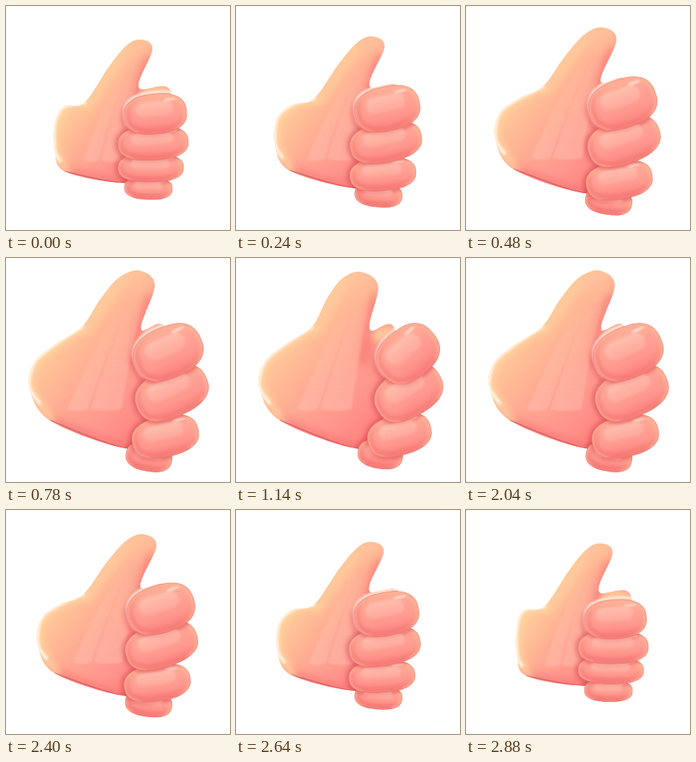
Animation, 280 px wide and 280 px high, one loop 2.94 s. Source, as an HTML page with a canvas:

```html
<!DOCTYPE html>
<html lang="en">
<head>
<meta charset="utf-8">
<title>Thumbs up</title>
<style>
  html, body { margin: 0; width: 100%; height: 100%; overflow: hidden; background: #fff; }
  canvas { display: block; width: 280px; height: 280px; }
</style>
</head>
<body>
<canvas id="stage" width="280" height="280"></canvas>
<script>
const ctx = document.getElementById('stage').getContext('2d');
const LOOP = 2940, STEP = 60, TURN = 1410, OPEN = 630, HOLD = 780;

// hand outline, clockwise: where each key point rests and where it opens to
const TIP = 0, INNER = 1, CROTCH = 2, UNDER = 4, HEEL = 5, BASE = 6, WRIST = 7, SHOULDER = 10, OUTER = 12;
const outline = [
  [168, 42, 167, 16], [183, 54, 186, 34], [166, 102, 169, 89], [206, 108, 200, 91],
  [190, 212, 197, 226], [145, 221, 150, 238], [74, 207, 55, 203], [61, 180, 29, 160],
  [61, 147, 36, 130], [72, 126, 60, 109], [98, 121, 95, 86], [128, 77, 119, 50], [150, 50, 142, 24]
];

const lerp = (a, b, k) => a + (b - a) * k;
const clamp = (v, lo, hi) => Math.max(lo, Math.min(hi, v));
const between = (p, q, k) => [lerp(p[0], q[0], k), lerp(p[1], q[1], k)];
const quad = (i, a, b, c) => a + b * i + c * i * i;

// the upper hand starts slowly; the thumb leans in, then back with the twist
function bodyAt(open, twist) {
  const lean = 30 * open * open * (1 - open) - 12 * twist;
  return outline.map(([x, y, x1, y1]) => {
    const k = y < 130 ? open * open : open;
    const high = Math.max(0, (115 - y) / 75);
    return [lerp(x, x1, k) + lean * high, lerp(y, y1, k) + 2 * twist * high];
  });
}

// i: 0 index finger to 3 little finger
function fingerAt(i, open, twist) {
  return {
    x: 187 - 3 * i + open * open * quad(i, 16, 13.5, -6.2) + twist * (14 - 4 * i),
    y: quad(i, 135, 39, -2.7) + open * (4 - 21 * Math.cos(1.25 * i)) + twist * (2 - 2 * i),
    rx: quad(i, 39, 9, -4) + open * (5 - 2 * i) + twist * (i - 4),
    ry: 25 - 3.6 * i + open * quad(i, 7, 3, -1.4),
    tilt: (2.7 * i - 6 + open * quad(i, -18, -8.8, 5.8) - 18 * twist * .4 ** i) * Math.PI / 180
  };
}

function spline(pts, closed) {
  const n = pts.length, path = new Path2D();
  const at = i => closed ? pts[(i + n) % n] : pts[clamp(i, 0, n - 1)];
  path.moveTo(...pts[0]);
  for (let i = 0; i < (closed ? n : n - 1); i++) {
    const [a, b, c, d] = [at(i - 1), at(i), at(i + 1), at(i + 2)];
    path.bezierCurveTo(b[0] + (c[0] - a[0]) / 6, b[1] + (c[1] - a[1]) / 6,
                       c[0] - (d[0] - b[0]) / 6, c[1] - (d[1] - b[1]) / 6, c[0], c[1]);
  }
  if (closed) path.closePath();
  return path;
}

// rounded pad: a superellipse
function pad({ x, y, rx, ry, tilt }) {
  const cos = Math.cos(tilt), sin = Math.sin(tilt);
  const bend = v => Math.sign(v) * Math.abs(v) ** .8;
  const pts = Array.from({ length: 32 }, (_, i) => {
    const a = i * Math.PI / 16, u = rx * bend(Math.cos(a)), w = ry * bend(Math.sin(a));
    return [x + u * cos - w * sin, y + u * sin + w * cos];
  });
  return spline(pts, true);
}

function gradient(x0, y0, x1, y1, ...stops) {
  const g = ctx.createLinearGradient(x0, y0, x1, y1);
  stops.forEach((c, i) => g.addColorStop(i / (stops.length - 1), c));
  return g;
}

function inside(path, draw) {
  ctx.save();
  ctx.clip(path);
  draw();
  ctx.restore();
}

function softFill(path, color, blur) {
  ctx.save();
  ctx.filter = `blur(${blur}px)`;
  ctx.fillStyle = color;
  ctx.fill(path);
  ctx.restore();
}

function softStroke(path, color, width, blur, dx = 0, dy = 0) {
  ctx.save();
  ctx.filter = `blur(${blur}px)`;
  ctx.translate(dx, dy);
  ctx.lineWidth = width;
  ctx.lineCap = 'round';
  ctx.strokeStyle = color;
  ctx.stroke(path);
  ctx.restore();
}

function oval(x, y, rx, ry) {
  const path = new Path2D();
  path.ellipse(x, y, rx, ry, 0, 0, 7);
  return path;
}

// light band running from the thumb down to the palm
function drawBand(p, k0, k1) {
  const foot = p[BASE][1] - 14;
  const edge = k => [between(p[OUTER], p[INNER], .1 + .8 * k), between(p[SHOULDER], p[CROTCH], k),
                     [lerp(p[WRIST][0], 160, k), foot]];
  const [a, b] = [edge(k0), edge(k1)];
  const path = new Path2D();
  path.moveTo(...a[0]);
  path.quadraticCurveTo(...a[1], ...a[2]);
  path.quadraticCurveTo((a[2][0] + b[2][0]) / 2, foot + 4, ...b[2]);
  path.quadraticCurveTo(...b[1], ...b[0]);
  softFill(path, gradient(0, a[0][1], 0, foot, '#ffc4a800', '#ffc4a855', '#ffc8b866'), 1);
}

function drawBody(p, fingerPaths) {
  const path = spline(p, true);
  const [wx, wy] = p[WRIST], [cx, cy] = p[CROTCH];
  ctx.fillStyle = gradient(wx + 5, wy - 50, 172, p[HEEL][1] - 15,
    '#ffd09a', '#ffbb95', '#ffa492', '#ff958b', '#ff807d');
  ctx.fill(path);

  inside(path, () => {
    // thumb: light tip and outer side, deep pink inner side
    softStroke(spline([p[SHOULDER], p[11], p[OUTER], p[TIP]]), '#ffcf9fcc', 14, 6, 4, 3);
    softFill(oval(...between(p[OUTER], p[INNER], .55), 17, 22), '#ffbe99bb', 7);
    softStroke(spline([between(p[INNER], p[CROTCH], .3), p[CROTCH], [cx - 8, cy + 40]]), '#f8706fbb', 12, 6);
    softFill(oval(cx + 22, cy + 7, 20, 10), '#ffd09fdd', 4);

    softStroke(spline([p[UNDER], p[HEEL], p[BASE]]), '#f76d70aa', 10, 6);
    softStroke(spline([p[BASE], p[WRIST], p[8], p[9], p[SHOULDER]]), '#ffd8a4cc', 8, 4, 3, 1);
    softStroke(spline([between(p[BASE], p[WRIST], .5), p[WRIST], p[8], p[9], p[SHOULDER]]), '#fff6e6', 4, 1.5);
    drawBand(p, .36, .56);
    drawBand(p, .58, .88);

    softStroke(fingerPaths[0], '#fff4e2', 4, 1, 0, -2);
    for (const f of fingerPaths.slice(1)) softStroke(f, '#d5434fcc', 5, 3);
    softStroke(fingerPaths[0], '#e0525caa', 5, 3, -1, 4);
    softStroke(spline([p[UNDER], p[HEEL], p[BASE]]), '#c9505499', 1.5, .6);
  });
}

function drawFinger({ x, y, rx, ry, tilt }, path, above) {
  const dx = -Math.sin(tilt) * ry, dy = Math.cos(tilt) * ry;
  ctx.fillStyle = gradient(x - dx, y - dy, x + dx, y + dy, '#ffb49c', '#ffa496', '#ff988e', '#fa7d79');
  ctx.fill(path);
  inside(path, () => {
    softStroke(path, '#f06468cc', 5, 3, 2, -2);
    softStroke(path, '#ffc29c', 4, 2.5, -1, 1);
    if (above) softStroke(above, '#e0505acc', 5, 2.5);
    ctx.translate(x, y);
    ctx.rotate(tilt);
    const gloss = new Path2D();
    gloss.roundRect(-rx * .62, -ry * .62, rx * 1.2, ry * .74, ry * .35);
    softFill(gloss, gradient(0, -ry * .6, 0, ry * .15, '#ffd2c088', '#ffc4b444'), 1.5);
    softFill(oval(rx * .5, -ry * .66, rx * .2, ry * .06), '#fff0e2aa', 1);
    softStroke(spline([[-rx * .6, ry * .9], [0, ry], [rx * .6, ry * .9]]), '#ef686a', 3, 2);
  });
  ctx.lineWidth = .6;
  ctx.strokeStyle = '#dc5c5e77';
  ctx.stroke(path);
}

// the way back mirrors the way out
function render(t) {
  const s = TURN - Math.abs(t - TURN);
  const open = Math.min(1, s / OPEN);
  const twist = 1.1 * Math.sin(clamp((s - HOLD) / OPEN, 0, 1) * Math.PI / 2);
  const fingers = [0, 1, 2, 3].map(i => fingerAt(i, open, twist));
  const paths = fingers.map(pad);
  ctx.fillStyle = '#fff';
  ctx.fillRect(0, 0, 280, 280);
  drawBody(bodyAt(open, twist), paths);
  for (let i = 3; i >= 0; i--) drawFinger(fingers[i], paths[i], paths[i - 1]);
}

const start = performance.now();
let shown = -1;
function tick() {
  const t = Math.floor((performance.now() - start) % LOOP / STEP) * STEP;
  if (t !== shown) render(shown = t);
  requestAnimationFrame(tick);
}
tick();
</script>
</body>
</html>
```
